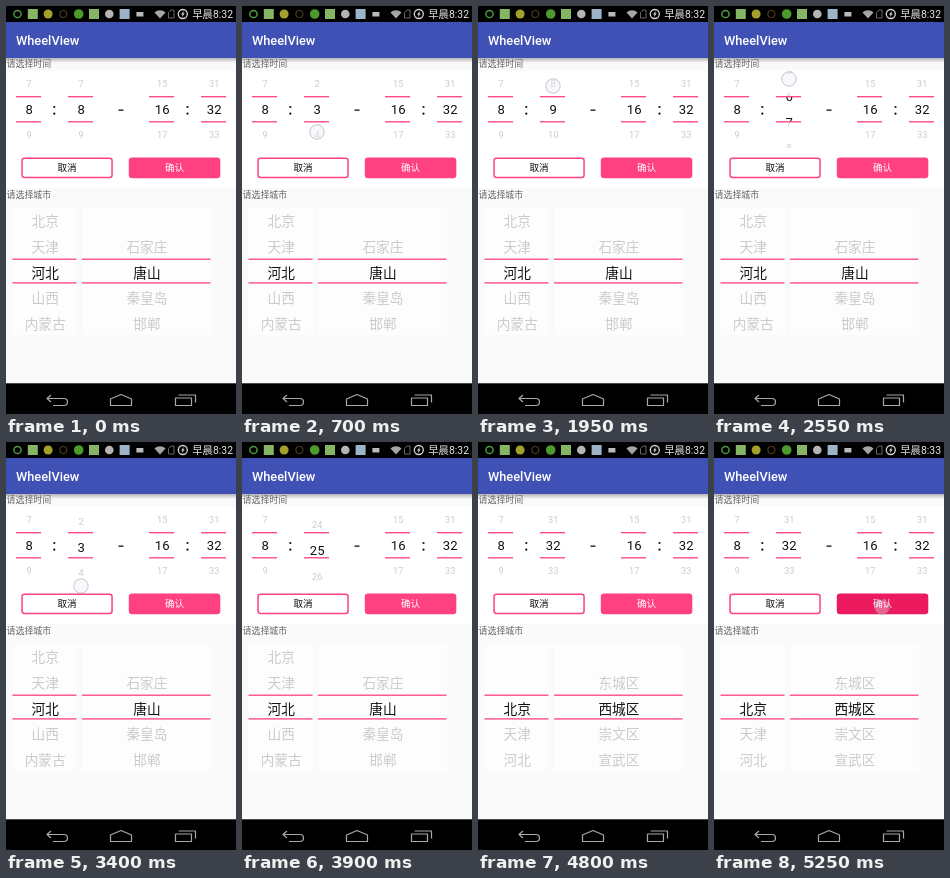
Write an HTML page with a canvas that moves like this. It is 230x408 px and loops after 5.3 s.

```html
<!DOCTYPE html>
<html lang="zh">
<head>
<meta charset="utf-8">
<title>WheelView</title>
<style>
html, body { margin: 0; width: 100%; height: 100%; overflow: hidden; background: #fafafa; }
canvas { display: block; width: 230px; height: 408px; }
</style>
</head>
<body>
<canvas id="stage"></canvas>
<script>
const W = 230, H = 408, LOOP = 5300, STEP = 50;
const PINK = '#ff4081', PRESSED = '#ec1a5f', INK = '#111', FAINT = '#cbcbcb';
const FONT = 'Roboto, "Noto Sans CJK SC", "Noto Sans CJK", sans-serif';
const ROW = 25.6, SLOP = 7;
const PROVINCES = ['北京', '天津', '河北', '山西', '内蒙古'];
const HEBEI = ['石家庄', '唐山', '秦皇岛', '邯郸'];
const BEIJING = ['东城区', '西城区', '崇文区', '宣武区'];

const swipe = (start, end, from, to, rest) => ({ start, end, from, to, rest });
const minutes = { x: 75, first: 8, swipes: [
  swipe(100, 350, 73, 141, 3),
  swipe(700, 950, 126, 58, 7),
  swipe(1350, 1650, 130, 75, 9),
  swipe(1950, 2200, 80, 137, 7),
  swipe(2400, 2700, 53, 93, 6),
  swipe(3050, 3400, 58, 144, 3),
  swipe(3550, 3700, 140, 70, 32)
] };
const province = { x: 39, first: 2, swipes: [swipe(4450, 4700, 262, 319, 0)] };
const press = { x: 168, swipes: [swipe(5050, LOOP, 165, 165)] };

const canvas = document.getElementById('stage');
const ctx = canvas.getContext('2d');
const dpr = window.devicePixelRatio || 1;
canvas.width = W * dpr;
canvas.height = H * dpr;

const fingerY = (s, t) => s.from + (s.to - s.from) * (t - s.start) / (s.end - s.start);

// The wheel follows the finger past a small slop, then flings to its rest row.
function wheelValue({ first, swipes }, t) {
  let value = first;
  for (const s of swipes) {
    if (t < s.start) break;
    const dy = fingerY(s, Math.min(t, s.end)) - s.from;
    const dragged = value - Math.sign(dy) * Math.max(0, Math.abs(dy) - SLOP) / ROW;
    if (t <= s.end) return dragged;
    const left = s.rest - dragged;
    const p = Math.min(1, (t - s.end) / (110 * Math.sqrt(Math.abs(left)) + 1));
    value = dragged + left * (1 - (1 - p) ** 3);
  }
  return value;
}

function rect(x, y, w, h, color) {
  ctx.fillStyle = color;
  ctx.fillRect(x, y, w, h);
}

function text(str, x, y, size, color, align = 'center', weight = 400) {
  ctx.font = `${weight} ${size}px ${FONT}`;
  ctx.textAlign = align;
  ctx.fillStyle = color;
  ctx.fillText(str, x, y + size * 0.36);
}

function path(points, close) {
  ctx.beginPath();
  points.forEach(([x, y]) => ctx.lineTo(x, y));
  if (close) ctx.closePath();
}

function circle(x, y, r) {
  ctx.beginPath();
  ctx.arc(x, y, r, 0, Math.PI * 2);
}

function dot(x, y, r, color) {
  circle(x, y, r);
  ctx.fillStyle = color;
  ctx.fill();
}

function ring(x, y, r, color, width) {
  circle(x, y, r);
  ctx.strokeStyle = color;
  ctx.lineWidth = width;
  ctx.stroke();
}

function clipped(x, y, w, h, draw) {
  ctx.save();
  ctx.beginPath();
  ctx.rect(x, y, w, h);
  ctx.clip();
  draw();
  ctx.restore();
}

function wheel({ x, w, top, bottom, mid, lines, big, small }, value, label) {
  const rows = (size, color) => {
    for (let i = Math.floor(value) - 2; i <= value + 3; i++) {
      const str = label(i);
      if (str) text(str, x + w / 2 + 0.7, mid + (i - value) * ROW, size, color);
    }
  };
  const [upper, lower] = lines;
  clipped(x, top, w, upper - top, () => rows(small, FAINT));
  clipped(x, lower, w, bottom - lower, () => rows(small, FAINT));
  clipped(x, upper, w, lower - upper, () => rows(big, INK));
  lines.forEach(y => rect(x, y - 0.65, w, 1.3, PINK));
}

function timeWheel(x, value) {
  wheel({ x, w: 25, top: 65, bottom: 142, mid: 103.3,
    lines: [90.7, 115.8], big: 13.1, small: 9.2 }, value,
    i => String((i + 60) % 60));
}

function cityWheel(x, w, value, list) {
  rect(x, 202, w, 127, '#fdfdfd');
  wheel({ x, w, top: 202, bottom: 329, mid: 266.6,
    lines: [253.2, 276.9], big: 13.7, small: 13.7 }, value, i => list[i]);
}

function button(x, label, fill, ink) {
  ctx.beginPath();
  ctx.roundRect(x + 0.75, 152.2, 90, 19.4, 2.5);
  ctx.fillStyle = fill;
  ctx.fill();
  ctx.lineWidth = 1.5;
  ctx.strokeStyle = fill === '#fff' ? PINK : fill;
  ctx.stroke();
  text(label, x + 45.75, 161.7, 9.6, ink);
}

function statusBar(t) {
  rect(0, 0, W, 16, '#000');
  const slot = i => 11.5 + 15.3 * i;
  ring(slot(0), 8, 3.6, '#4f9a3c', 1.5);
  [1, 5].forEach(i => rect(slot(i) - 5, 3, 10, 10, '#86b565'));
  dot(slot(2), 8, 4.5, '#a3a02c');
  ring(slot(3), 8, 3.5, '#4a3a18', 1.2);
  dot(slot(4), 8, 4.8, '#4d9a2c');
  dot(slot(6), 8, 4.3, '#b5b5b5');
  rect(slot(7) - 5, 3, 10, 10, '#9db4c8');
  rect(slot(8) - 3.5, 6, 7, 4.5, '#bbb');

  path([[154, 12.5], [148.5, 6.5], [151, 4.8], [154, 4.2], [157, 4.8], [159.5, 6.5]], true);
  ctx.fillStyle = '#a5a5a5';
  ctx.fill();
  path([[162.5, 12], [162.5, 6.5], [165, 4], [168, 4], [168, 12]], true);
  ctx.strokeStyle = '#666';
  ctx.lineWidth = 1;
  ctx.stroke();
  ring(176.8, 8, 4.5, '#d5d5d5', 1.3);
  path([[177.8, 5], [175, 8.5], [176.6, 8.5], [176, 11], [178.7, 7.5], [177.2, 7.5]], true);
  ctx.fillStyle = '#ddd';
  ctx.fill();
  text(t < 5000 ? '早晨8:32' : '早晨8:33', 227, 8, 10.4, '#e8e8e8', 'right');
}

function navBar() {
  rect(0, 377.3, W, 30.7, '#000');
  ctx.strokeStyle = '#a8a8a8';
  ctx.lineWidth = 1.2;
  ctx.lineJoin = 'round';
  path([[45, 389], [41, 392.5], [45, 396]]);
  ctx.moveTo(41, 392.5);
  ctx.lineTo(58, 392.5);
  ctx.arc(58, 396, 3.5, -Math.PI / 2, Math.PI / 2);
  ctx.lineTo(47, 399.5);
  ctx.stroke();
  path([[104.5, 399.5], [104.5, 393], [115, 388.5], [125.5, 393], [125.5, 399.5]], true);
  ctx.stroke();
  ctx.strokeRect(169.5, 392, 16, 7.5);
  path([[172.5, 389], [189.5, 389], [189.5, 396.5]]);
  ctx.stroke();
}

function appBar() {
  rect(0, 16, W, 36, '#3f51b5');
  text('WheelView', 10, 34, 12.8, '#fff', 'left', 500);
  const shade = ctx.createLinearGradient(0, 52, 0, 57);
  shade.addColorStop(0, 'rgba(0,0,0,0.28)');
  shade.addColorStop(1, 'rgba(0,0,0,0)');
  rect(0, 52, W, 5, shade);
}

function finger({ x, swipes }, t) {
  const s = swipes.find(({ start, end }) => t >= start && t <= end);
  if (!s) return;
  const y = fingerY(s, t);
  dot(x, y, 7, 'rgba(235,235,245,0.35)');
  ring(x, y, 7.2, 'rgba(150,150,175,0.55)', 1);
}

function draw(t) {
  ctx.setTransform(dpr, 0, 0, dpr, 0, 0);
  rect(0, 0, W, H, '#fafafa');
  statusBar(t);
  appBar();

  text('请选择时间', 0.5, 58.2, 8.95, '#666', 'left');
  rect(0, 65, W, 117, '#fff');
  timeWheel(10, 8);
  timeWheel(62, wheelValue(minutes, t));
  timeWheel(143, 16);
  timeWheel(195, 32);
  [48.3, 181.5].forEach(x => [101, 107.7].forEach(y => dot(x, y, 1.1, INK)));
  rect(112.5, 103.5, 5, 1.3, INK);
  button(15.3, '取消', '#fff', INK);
  button(122.8, '确认', t >= press.swipes[0].start ? PRESSED : PINK, '#fff');

  text('请选择城市', 0.5, 188.7, 8.95, '#666', 'left');
  cityWheel(6.5, 64, wheelValue(province, t), PROVINCES);
  cityWheel(76, 128.5, 1, t < 4750 ? HEBEI : BEIJING);

  navBar();
  [minutes, province, press].forEach(touch => finger(touch, t));
}

const start = performance.now();
function tick() {
  const t = (performance.now() - start) % LOOP;
  draw(Math.floor(t / STEP) * STEP);
  requestAnimationFrame(tick);
}
tick();
</script>
</body>
</html>
```
